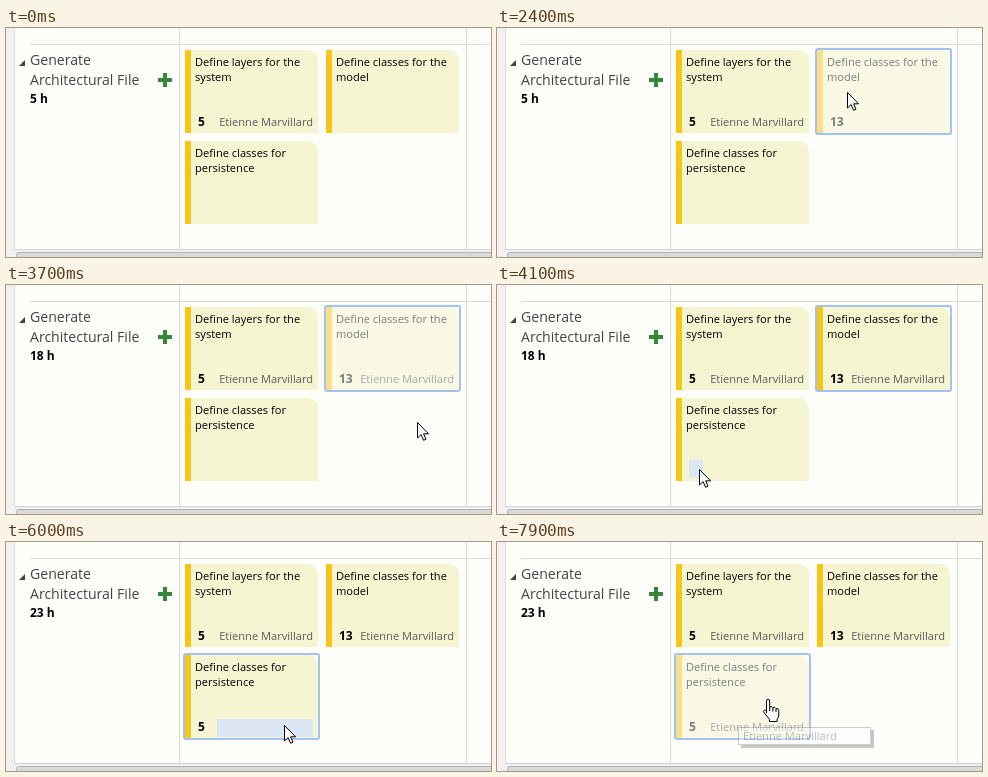
An HTML page for the animation above (8 s loop, 485 px wide and 229 px high).

```html
<!DOCTYPE html>
<html lang="en">
<head>
<meta charset="utf-8">
<title>Task board</title>
<style>
  html, body { margin: 0; width: 100%; height: 100%; overflow: hidden; background: #fdfdfa; }
  svg { display: block; font: 11.1px "Open Sans", "Noto Sans", sans-serif; }
  .bold { font-weight: 700; font-size: 12px; }
  .title { font-size: 14.1px; fill: #444; }
  .grey { fill: #5c5c5c; }
</style>
</head>
<body>
<svg id="stage" width="485" height="229" viewBox="0 0 485 229"></svg>
<script>
const LOOP = 8000, STEP = 100;
const PERSON = 'Etienne Marvillard', NOBODY = 'Unassigned';
const BLUE = '#dde6f5', EFFORTS = [1, 2, 3, 5, 8, 13];
const stage = document.getElementById('stage');

const rect = (x, y, w, h, fill, more = '') =>
  `<rect x="${x}" y="${y}" width="${w}" height="${h}" fill="${fill}" ${more}/>`;
const text = (x, y, s, cls = '', more = '') =>
  `<text x="${x}" y="${y}" class="${cls}" ${more}>${s}</text>`;
const box = (x, y, w, h, fill, line) =>
  rect(x + .5, y + .5, w - 1, h - 1, fill, `stroke="${line}"`);
const group = (opacity, s) => `<g opacity="${opacity}">${s}</g>`;

function board(total) {
  return rect(0, 0, 485, 229, '#fdfdfa')
    + rect(0, 0, 8, 229, '#f0f0f0') + rect(8, 0, 1, 222, '#dcdcdc')
    + rect(24, 16, 461, 1, '#dcdcdc') + rect(8, 221, 477, 1, '#d4d4d4')
    + rect(173, 0, 1, 221, '#dcdcdc') + rect(460, 0, 1, 221, '#dcdcdc')
    + rect(8, 222, 477, 7, '#f0f0f0')
    + rect(10.5, 224.5, 480, 9, '#d9d9d9', 'rx="2" stroke="#b4b4b4"')
    + '<path d="M19 32v6h-6z" fill="#444"/>'
    + rect(157, 45, 4, 14, '#35883a') + rect(152, 50, 14, 4, '#35883a')
    + text(24, 37, 'Generate', 'title') + text(24, 57, 'Architectural File', 'title')
    + text(24, 75, total + ' h', 'bold');
}

function card(x, y, lines, o) {
  const body = `<path d="M${x} ${y}h121q12 0 12 12v71h-133z" fill="#f5f5d2"/>`
    + rect(x, y, 6, 83, '#f5c518')
    + (o.hover === 'effort' ? rect(x + 13, y + 62, 14, 18, BLUE) : '')
    + (o.hover === 'person' ? rect(x + 32, y + 64, 96, 18, BLUE) : '')
    + lines.map((s, i) => text(x + 10, y + 16 + 15 * i, s)).join('')
    + (o.effort ? text(x + 13, y + 76, o.effort, 'bold') : '')
    + (o.person ? text(x + 128, y + 76, PERSON, 'grey', 'text-anchor="end"') : '');
  return group(o.saving ? .5 : 1, body) + (o.selected
    ? rect(x - 1, y - 1, 135, 85, 'none', 'rx="2" stroke="#a3c2f0" stroke-width="2"') : '');
}

// Both lists take the corner of their card; hover is a row index.
function effortList(x, y, hover) {
  const left = x + 13, top = y - 83;
  return rect(left + 2, top + 139, 42, 24, '#fffff8')
    + box(left, top, 46, 140, '#fff', '#bdbdbd')
    + EFFORTS.map((n, i) => (i === hover ? rect(left + 1, top + 1 + 23 * i, 44, 23, BLUE) : '')
      + text(left + 4, top + 17 + 23 * i, n, 'bold')).join('');
}

function personList(x, y, top, hover) {
  return rect(x + 14, y + 64, 114, 21, BLUE) + text(x + 16, y + 79, NOBODY, 'grey')
    + box(x + 12, top, 140, 44, '#fff', '#bdbdbd')
    + [NOBODY, PERSON].map((s, i) =>
      (i === 0 || i === hover ? rect(x + 13, top + 1 + 21 * i, 138, 21, BLUE) : '')
      + text(x + 16, top + 15 + 21 * i, s, 'grey')).join('');
}

const tip = (x, y, w, s, opacity) => group(opacity,
  rect(x + 3, y + 3, w, 18, '#777') + box(x, y, w, 18, '#fff', '#888')
  + text(x + 5, y + 13, s, 'grey'));

const shapes = {
  arrow: '<path d="M.5 .5v15.5l3.6-3.4 2.5 5.7 2.4-1.1-2.4-5.4h5z" fill="#fff" stroke="#000"/>',
  beam: '<path d="M-3.5-7.5h2.5q1 0 1 1 0-1 1-1h2.5M0-7v14M-3.5 7.5h2.5q1 0 1-1 0 1 1 1h2.5" fill="none" stroke="#222" stroke-width="1.2"/>',
  hand: '<path d="M-1.5 14v-12q0-1.7 1.6-1.7t1.6 1.7v6q2.6-1.2 3.2.8 2.4-1 3.1.9 2.8-.6 2.8 1.8v4.5q0 2.8-1.7 4.2v2.3h-7.7v-2.3l-5.4-6.6q-1-1.6.4-2.4 1-.5 2.1.8z" fill="#fff" stroke="#000" stroke-linejoin="round"/><path d="M1.7 8v4M4.9 9v3.5M8 10v3" stroke="#000"/>'
};

// time, x, y, shape from that time on
const path = [
  [100, 360, 117, 'arrow'], [200, 347, 108, 'arrow'], [400, 341, 89, 'arrow'],
  [1400, 342, 90, 'beam'], [1800, 342, 90, 'beam'], [2000, 349, 70, 'hand'],
  [2100, 350, 64, 'hand'], [2300, 350, 64, 'arrow'], [2400, 350, 64, 'arrow'],
  [2800, 404, 92, 'arrow'], [3000, 404, 92, 'arrow'], [3200, 409, 117, 'hand'],
  [3400, 411, 137, 'hand'], [3600, 411, 137, 'arrow'], [3700, 411, 137, 'arrow'],
  [4100, 202, 184, 'arrow'], [4300, 201, 183, 'arrow'], [4500, 202, 184, 'beam'],
  [4800, 202, 184, 'beam'], [4900, 208, 150, 'hand'], [5100, 212, 127, 'hand'],
  [5300, 213, 106, 'hand'], [5500, 213, 106, 'arrow'], [5600, 213, 106, 'arrow'],
  [6000, 278, 183, 'arrow'], [6900, 278, 183, 'arrow'], [7000, 276, 173, 'hand'],
  [7200, 271, 157, 'hand'], [LOOP, 271, 157, 'hand']
];

function cursor(t) {
  if (t < path[0][0]) return '';
  const i = path.findIndex(p => p[0] > t) - 1;
  const [t0, x0, y0, shape] = path[i], [t1, x1, y1] = path[i + 1];
  const k = (t - t0) / (t1 - t0);
  const x = Math.round(x0 + (x1 - x0) * k), y = Math.round(y0 + (y1 - y0) * k);
  return `<g transform="translate(${x} ${y})">${shapes[shape]}</g>`;
}

function draw(t) {
  const during = (...spans) => spans.some(([a, b]) => t >= a && t < b);
  const model = {
    effort: t >= 2300 && 13, person: t >= 3600,
    saving: during([2300, 2500], [3600, 3800]),
    selected: during([2300, 3000], [3600, 4500]),
    hover: during([400, 1400]) ? 'effort' : during([2700, 3000]) ? 'person' : ''
  };
  const storage = {
    effort: t >= 5500 && 5, person: t >= 7700,
    saving: during([5500, 5800], [7700, LOOP]),
    selected: during([5500, 6200], [7700, LOOP]),
    hover: during([4100, 4500]) ? 'effort' : during([5900, 6200]) ? 'person' : ''
  };
  let s = board(t < 2500 ? 5 : t < 5800 ? 18 : 23)
    + card(179, 22, ['Define layers for the', 'system'], { effort: 5, person: true })
    + card(320, 22, ['Define classes for the', 'model'], model)
    + card(179, 113, ['Define classes for', 'persistence'], storage);

  if (during([1500, 2300])) s += effortList(320, 22, t >= 2000 ? 5 : -1);
  if (during([3000, 3600])) s += personList(320, 22, 107, t >= 3300 ? 1 : 0);
  if (during([4600, 5500])) s += effortList(179, 113, t < 4900 ? -1 : t < 5100 ? 5 : t < 5300 ? 4 : 3);
  if (during([6200, 7700])) s += personList(179, 113, 133, t >= 7000 ? 1 : 0);
  if (during([6800, 7000])) s += tip(285, 207, 74, NOBODY, t < 6900 ? .5 : 1);
  if (t >= 7800) s += tip(241, 185, 133, PERSON, t < 7900 ? .2 : .4);
  stage.innerHTML = s + cursor(t);
}

let last = -1;
function tick() {
  const t = Math.floor(performance.now() % LOOP / STEP) * STEP;
  if (t !== last) draw(last = t);
  requestAnimationFrame(tick);
}
tick();
</script>
</body>
</html>
```
